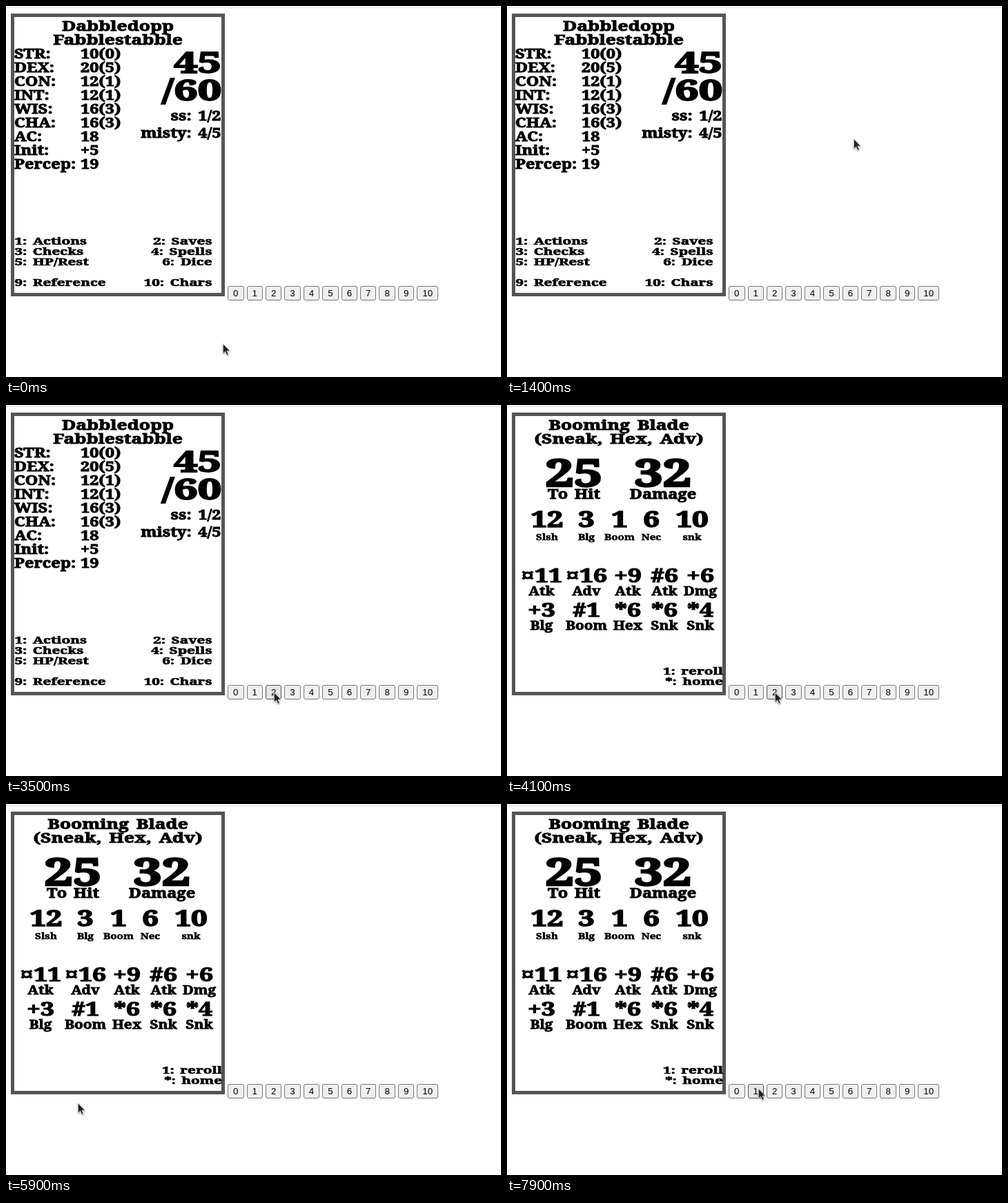
Animation, 717 px wide and 538 px high, one loop 8000 ms. Source, as an HTML page:

```html
<!DOCTYPE html>
<html lang="en">
<head>
<meta charset="utf-8">
<title>Character sheet</title>
<style>
  html, body { margin: 0; width: 100%; height: 100%; overflow: hidden; background: #fff; }
  svg { position: absolute; left: 0; top: 0; width: 717px; height: 538px; pointer-events: none; }
  .page text {
    font-family: "Noto Serif", serif; font-weight: 700; word-spacing: .15em;
    stroke: #000; stroke-width: .045em;
  }
  #buttons { position: absolute; left: 321.1px; top: 406px; display: flex; gap: 4px; pointer-events: none; }
  button {
    appearance: none; box-sizing: border-box; height: 21px; margin: 0; padding: 2px 7px;
    font: 13.333px/15px "Liberation Sans", Arial, sans-serif; color: #000;
    background: #efefef; border: 1px solid #767676; border-radius: 3px;
  }
  button.hover { background: #e5e5e5; border-color: #4f4f4f; }
  button.down { background: #f5f5f5; border-color: #8d8d8d; }
  #cursor { filter: drop-shadow(.5px 1px 1px rgba(0, 0, 0, .4)); }
</style>
</head>
<body>
<svg viewBox="0 0 717 538">
  <rect y="2" width="717" height="1" fill="#dcdcdc"/>
  <rect x="9.5" y="13.5" width="305" height="405" fill="#fff" stroke="#555" stroke-width="5"/>
  <g id="home" class="page"></g>
  <g id="attack" class="page"></g>
</svg>
<div id="buttons"></div>
<svg viewBox="0 0 717 538">
  <path id="cursor" d="M.2 .6V15.2L3.6 12.2L5.9 17.4L8.4 16.3L6.1 11.3H10.6Z"
        fill="#222" stroke="#fff" stroke-width=".8"/>
</svg>
<script>
const $ = id => document.getElementById(id);
const home = $('home'), attack = $('attack'), cursor = $('cursor');

// Type styles: size and horizontal expansion of the face
const STYLES = {
  title: [20, 1.32], stat: [20, 1.18], menu: [15, 1.38], hp: [41, 1.5],
  total: [55, 1.34], part: [32, 1.32], die: [26.5, 1.35],
  label: [18, 1.16], tiny: [13, 1.17]
};

function write(page, style, text, x, y, anchor = 'middle') {
  const [size, wide] = STYLES[style];
  const el = document.createElementNS('http://www.w3.org/2000/svg', 'text');
  el.setAttribute('transform', `translate(${x} ${y}) scale(${wide} 1)`);
  el.setAttribute('font-size', size);
  el.setAttribute('text-anchor', anchor);
  el.textContent = text;
  page.append(el);
}

function column(page, style, lines, x, y, pitch, anchor) {
  lines.forEach((line, i) => line && write(page, style, line, x, y + pitch * i, anchor));
}

function row(style, words, xs, y) {
  words.split(' ').forEach((word, i) => write(attack, style, word, xs[i], y));
}

// Home page
column(home, 'title', ['Dabbledopp', 'Fabblestabble'], 162, 36, 20);
column(home, 'stat', 'STR: DEX: CON: INT: WIS: CHA: AC: Init: Percep:'.split(' '), 12, 76, 20, 'start');
column(home, 'stat', '10(0) 20(5) 12(1) 12(1) 16(3) 16(3) 18 +5 19'.split(' '), 108, 76, 20, 'start');
column(home, 'hp', ['45', '/60'], 312, 97, 40, 'end');
column(home, 'stat', ['ss: 1/2', 'misty: 4/5'], 311.5, 166, 25, 'end');
column(home, 'menu', ['1: Actions', '3: Checks', '5: HP/Rest', '', '9: Reference'], 12.5, 346, 15, 'start');
column(home, 'menu', ['2: Saves', '4: Spells', '6: Dice', '', '10: Chars'], 298.5, 346, 15, 'end');

// Attack page
const halves = [97, 226], parts = [58, 115, 163, 209, 268], dice = [50, 115, 175, 228, 280];
column(attack, 'title', ['Booming Blade', '(Sneak, Hex, Adv)'], 162, 36, 20);
row('total', '25 32', halves, 118);
column(attack, 'stat', ['To Hit'], halves[0], 136, 0);
column(attack, 'stat', ['Damage'], halves[1], 136, 0);
row('part', '12 3 1 6 10', parts, 177);
row('tiny', 'Slsh Blg Boom Nec snk', parts, 196);
row('die', '¤11 ¤16 +9 #6 +6', dice, 257);
row('label', 'Atk Adv Atk Atk Dmg', dice, 276);
row('die', '+3 #1 *6 *6 *4', dice, 307);
row('label', 'Blg Boom Hex Snk Snk', dice, 326);
column(attack, 'menu', ['1: reroll', '*: home'], 313, 391, 15, 'end');

const buttons = Array.from({ length: 11 }, (_, i) => {
  const el = document.createElement('button');
  el.textContent = i;
  $('buttons').append(el);
  return el;
});

// Pointer moves: begin, end and the points passed at even intervals
const MOVES = [
  [400, 1300, [[314, 489], [158, 220], [240, 70], [480, 110], [502, 192]]],
  [2000, 2100, [[502, 192], [490, 227]]],
  [2200, 2900, [[490, 227], [443, 335], [388, 416]]],
  [4200, 4900, [[388, 416], [322, 470], [240, 503]]],
  [5100, 5500, [[240, 503], [115, 500]]],
  [5700, 6700, [[115, 500], [104, 433], [77, 360], [200, 326], [350, 316], [382, 315]]],
  [7000, 7600, [[382, 315], [364, 412]]]
];
const STEP = 100, LOOP = 8000, PAGE_TURN = 4100, PRESSES = [3400, 7800];

// Smooth curve through the points, k from 0 to 1; a straight move eases in and out
function along(pts, k) {
  const n = pts.length - 1;
  if (n === 1) k = k * k * (3 - 2 * k);
  const i = Math.min(Math.floor(k * n), n - 1), u = k * n - i;
  const at = j => pts[Math.max(0, Math.min(n, j))];
  return [0, 1].map(c => {
    const [a, b, d, e] = [at(i - 1)[c], at(i)[c], at(i + 1)[c], at(i + 2)[c]];
    return b + u / 2 * (d - a + u * (2 * a - 5 * b + 4 * d - e + u * (3 * (b - d) + e - a)));
  });
}

function pointer(t) {
  const [from, to, pts] = MOVES.findLast(m => t >= m[0]) || MOVES[0];
  const k = Math.max(0, Math.min(1, (t - from) / (to - from)));
  return along(pts, k).map(Math.round);
}

function draw(now) {
  const t = Math.floor((now % LOOP) / STEP) * STEP;
  const [x, y] = pointer(t);
  cursor.setAttribute('transform', `translate(${x} ${y})`);
  home.style.display = t < PAGE_TURN ? '' : 'none';
  attack.style.display = t < PAGE_TURN ? 'none' : '';
  for (const b of buttons) {
    const r = b.getBoundingClientRect();
    const over = x >= r.left && x < r.right && y >= r.top && y < r.bottom;
    b.className = !over ? '' : PRESSES.includes(t) ? 'down' : 'hover';
  }
}

const start = performance.now();
function tick() {
  draw(performance.now() - start);
  requestAnimationFrame(tick);
}
tick();
</script>
</body>
</html>
```
